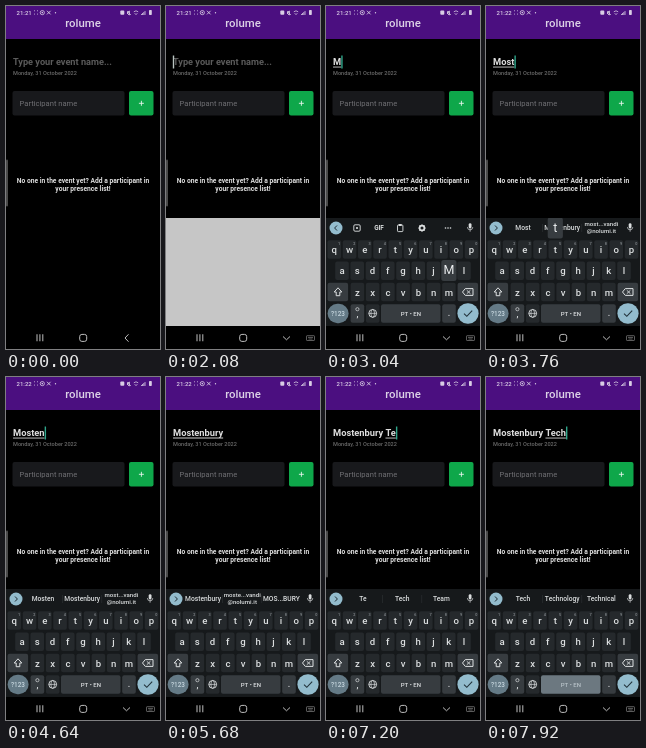
Write an HTML page with a canvas that moves like this. It is 154 px wide and 343 px high and loops after 8 s.

```html
<!DOCTYPE html>
<html lang="en">
<head>
<meta charset="utf-8">
<title>Presence list</title>
<style>
html, body { margin: 0; width: 100%; height: 100%; overflow: hidden; background: #000; }
canvas { display: block; width: 154px; height: 343px; }
</style>
</head>
<body>
<canvas id="stage"></canvas>
<script>
const W = 154, H = 343, LOOP = 8000;
const canvas = document.getElementById('stage');
const ctx = canvas.getContext('2d');
const ratio = window.devicePixelRatio || 1;
canvas.width = W * ratio;
canvas.height = H * ratio;

const TYPED = 'Mostenbury Tech';
const STROKES = [2940, 3200, 3520, 3760, 4240, 4480, 4760, 4900, 5040, 5160,
  6240, 6800, 7040, 7360, 7520];
const FOCUS = 2000, SLIDE_START = 2120, SLIDE_END = 2420, POPUP = 130;
const KB_TOP = 212, KB_BOTTOM = 320;
const PANEL = '#16191b', KEY = '#25292c', MOD = '#373c40';
const INK = '#dcdfe0', ACCENT = '#93bccd';
const ROWS = [
  { keys: 'qwertyuiop', x: 8.3, y: 243.5 },
  { keys: 'asdfghjkl', x: 16, y: 264.7 },
  { keys: 'zxcvbnm', x: 31.4, y: 286 }
];
const STEP = 15.25;

function box(x, y, w, h, color, r = 0) {
  ctx.fillStyle = color;
  ctx.beginPath();
  ctx.roundRect(x, y, w, h, r);
  ctx.fill();
}

function disc(x, y, r, color) {
  ctx.fillStyle = color;
  ctx.beginPath();
  ctx.arc(x, y, r, 0, 7);
  ctx.fill();
}

function ring(x, y, r, color, width = 0.8) {
  ctx.strokeStyle = color;
  ctx.lineWidth = width;
  ctx.beginPath();
  ctx.arc(x, y, r, 0, 7);
  ctx.stroke();
}

function line(points, color, width = 0.9) {
  ctx.strokeStyle = color;
  ctx.lineWidth = width;
  ctx.beginPath();
  points.forEach(([x, y]) => ctx.lineTo(x, y));
  ctx.stroke();
}

function frame(x, y, w, h, color, r = 1, width = 0.9) {
  ctx.strokeStyle = color;
  ctx.lineWidth = width;
  ctx.beginPath();
  ctx.roundRect(x, y, w, h, r);
  ctx.stroke();
}

function label(str, x, y, size, color, { weight = 400, align = 'left' } = {}) {
  ctx.font = `${weight} ${size}px Roboto, sans-serif`;
  ctx.textAlign = align;
  ctx.fillStyle = color;
  ctx.fillText(str, x, y);
  return ctx.measureText(str).width;
}

const centered = (str, x, y, size, color, weight = 400) =>
  label(str, x, y, size, color, { weight, align: 'center' });

function statusBar(t) {
  const c = '#d9cde4';
  label(t < 3760 ? '21:21' : '21:22', 10.5, 9, 6, c, { weight: 500 });
  for (const x of [28.5, 31.5]) {
    for (const y of [4.8, 8]) disc(x, y, 0.5, c);
  }
  ring(36.3, 6.6, 2.1, c, 0.8);
  disc(36.3, 6.6, 0.8, c);
  line([[41, 4.8], [44.6, 8.4]], c, 0.9);
  line([[44.6, 4.8], [41, 8.4]], c, 0.9);
  disc(49.5, 6.7, 0.7, c);
  box(114.3, 4.6, 4, 4.2, c, 1);
  line([[121, 7], [123.3, 5], [123.3, 9], [121, 7]], c, 1);
  line([[121, 5], [125, 9]], c, 0.7);
  line([[127.8, 5.8], [130, 4.8], [132.2, 5.8]], c, 0.8);
  line([[128.7, 7.2], [130, 8.6], [131.3, 7.2]], c, 0.8);
  for (let i = 0; i < 4; i++) box(135 + i * 1.2, 8 - i, 0.8, 1 + i, c);
  box(143, 4, 2.8, 5, c, 0.7);
}

function navBar(open) {
  const c = '#bdbdbd';
  box(0, KB_BOTTOM, W, H - KB_BOTTOM, '#000');
  for (let i = 0; i < 3; i++) box(30.5 + i * 2.9, 328.3, 1, 7, c);
  frame(73.7, 328.4, 7, 7, c, 2.2, 1);
  if (open) {
    line([[117, 330.5], [120.5, 333.8], [124, 330.5]], c, 1);
    frame(140.5, 329.7, 8, 4.8, '#858585', 0.6, 0.7);
    line([[142, 331.4], [147, 331.4]], '#858585', 0.7);
    line([[142.5, 333], [146.5, 333]], '#858585', 0.7);
  } else {
    line([[122.5, 328.3], [119, 332], [122.5, 335.7]], c, 1);
  }
}

function page(t, text) {
  box(0, 0, W, H, '#000');
  box(0, 0, W, 33, '#4b0f80');
  statusBar(t);
  centered('rolume', 77, 20.6, 11.4, '#ddd3e6', 500);

  let caretX = 7.2;
  if (text) {
    caretX += label(text, 7, 59.3, 9.3, '#dedede', { weight: 600 }) + 0.3;
    const start = text.lastIndexOf(' ') + 1;
    if (start < text.length) {
      const x = 7 + ctx.measureText(text.slice(0, start)).width;
      box(x, 60.6, ctx.measureText(text.slice(start)).width, 0.9, '#cfcfcf');
    }
  } else {
    label('Type your event name...', 7, 59.3, 9.2, '#5b5b5b', { weight: 600 });
  }
  const since = t - STROKES.reduce((last, s) => s <= t ? s : last, FOCUS);
  if (since >= 0 && Math.floor(since / 500) % 2 === 0) {
    box(caretX - 0.4, 49.5, 1.4, 13, text ? '#2fa58a' : '#b9c4c1');
  }

  label('Monday, 31 October 2022', 7, 68.8, 5.6, '#686868', { weight: 500 });
  box(6.5, 85, 112, 24.5, '#18191c', 2);
  label('Participant name', 13.5, 100, 7.6, '#707074');
  box(123, 85, 24.5, 24.5, '#0ea74a', 2);
  line([[132.9, 97.3], [137.9, 97.3]], '#e8f5ec', 0.9);
  line([[135.4, 94.8], [135.4, 99.8]], '#e8f5ec', 0.9);
  centered('No one in the event yet? Add a participant in', 77, 177.3, 6.7, '#dedede', 700);
  centered('your presence list!', 77, 185.3, 6.7, '#dedede', 700);
  box(0, 153.5, 2, 47, '#4b4b4b', 1);
}

function suggestions(text) {
  const [first, second] = text.split(' ');
  if (second === '') return ['Tech', 'United', 'By'];
  if (second) {
    return second.length < 3 ? [second, 'Tech', 'Team'] : [second, 'Technology', 'Technical'];
  }
  if (first.length < 4) return [first, 'Most', 'More'];
  if (first.length < 10) return [first, 'Mostenbury', 'most...vandi\n@nolumi.it'];
  return [first, 'moste...vandi\n@nolumi.it', 'MOS...BURY'];
}

function micIcon() {
  box(142.7, 217.2, 2.8, 5.2, INK, 1.4);
  line([[141.4, 221.1], [142.2, 223.3], [146, 223.3], [146.8, 221.1]], INK, 0.7);
  line([[144.1, 223.3], [144.1, 225.6]], INK, 0.8);
}

function toolbar(text, showWords) {
  disc(10, 222, 6.5, ACCENT);
  const d = showWords ? 1 : -1;
  line([[10 - d, 219.5], [10 + 1.4 * d, 222], [10 - d, 224.5]], '#1d2b33', 1);
  micIcon();
  if (showWords) {
    suggestions(text).forEach((word, i) => {
      const x = 37 + i * 39.2;
      const parts = word.split('\n');
      if (parts.length > 1) parts.forEach((p, j) => centered(p, x, 219.6 + j * 7.3, 6.1, INK, 500));
      else centered(word, x, 224.3, 6.7, INK, 500);
      if (i) box(x - 19.8, 218, 0.5, 8, '#33383b');
    });
    return;
  }
  frame(27.8, 218.8, 6.4, 6.4, INK, 1.2);
  disc(31, 222, 1.1, INK);
  centered('GIF', 53, 224.4, 6.4, INK, 700);
  frame(71.5, 219, 5.4, 6.6, INK, 0.8);
  box(72.7, 218, 3, 2, INK, 0.5);
  ring(96, 222, 2.4, INK, 1.7);
  for (let i = 0; i < 8; i++) {
    const a = i * Math.PI / 4;
    disc(96 + 3.2 * Math.cos(a), 222 + 3.2 * Math.sin(a), 0.6, INK);
  }
  for (let i = -1; i < 2; i++) disc(122 + i * 2.5, 222, 0.8, INK);
}

function letterKeys(caps) {
  ROWS.forEach(({ keys, x, y }, row) => [...keys].forEach((ch, i) => {
    const cx = x + i * STEP;
    box(cx - 6.8, y - 9.3, 13.6, 18.6, KEY, 2);
    centered(caps ? ch.toUpperCase() : ch, cx, y + 3.5, 9.6, INK, 500);
    if (row === 0) centered(String((i + 1) % 10), cx + 4.8, y - 4.5, 3.8, '#a3a9ad');
  }));
}

function modifierKeys(caps, spaceDown) {
  box(1.6, 276.7, 20.5, 18.6, MOD, 2);
  const arrow = [[12, 281.8], [15.8, 286], [13.8, 286], [13.8, 289.7],
    [10.2, 289.7], [10.2, 286], [8.2, 286], [12, 281.8]];
  line(arrow, INK, 1);
  if (caps) {
    ctx.fillStyle = INK;
    ctx.fill();
  }
  box(131.6, 276.7, 20.5, 18.6, MOD, 2);
  line([[136.5, 286], [139.3, 282.6], [147, 282.6], [147, 289.4], [139.3, 289.4], [136.5, 286]], INK, 1);
  line([[140.8, 284.3], [144.4, 287.7]], INK, 0.9);
  line([[144.4, 284.3], [140.8, 287.7]], INK, 0.9);

  box(1.6, 297.8, 21, 19.4, '#647a86', 9.7);
  centered('?123', 12, 309.8, 6.4, '#c6d6de', 500);
  box(24.6, 298.2, 13.6, 18.6, MOD, 2);
  ring(31.4, 303.2, 1.6, INK, 0.7);
  centered(',', 31.4, 311, 9, INK, 500);
  box(39.9, 298.2, 13.6, 18.6, KEY, 2);
  ring(46.7, 307.4, 3.9, INK, 0.9);
  line([[42.8, 307.4], [50.6, 307.4]], INK, 0.7);
  ctx.beginPath();
  ctx.ellipse(46.7, 307.4, 1.8, 3.9, 0, 0, 7);
  ctx.stroke();
  box(55, 298.2, 59.5, 18.6, spaceDown ? '#6c7880' : MOD, 2);
  centered('PT • EN', 84.8, 309.6, 6, spaceDown ? '#b9c3c8' : INK, 500);
  box(116.2, 298.2, 13.6, 18.6, MOD, 2);
  centered('.', 123, 309.5, 9, INK, 500);
  box(131.4, 297.3, 21.2, 20.4, ACCENT, 10.2);
  line([[138, 307.6], [140.8, 310.3], [146.2, 304.6]], '#22323a', 1.1);
}

function popup(ch) {
  const row = ROWS.find(r => r.keys.includes(ch.toLowerCase()));
  if (!row) return;
  const x = row.x + row.keys.indexOf(ch.toLowerCase()) * STEP;
  const y = row.y - 22;
  box(x - 7.6, y - 10, 15.2, 21, MOD, 2.5);
  centered(ch, x, y + 4, 12.5, '#eef1f2');
}

function keyboard(t, text) {
  const p = Math.min(1, Math.max(0, (t - SLIDE_START) / (SLIDE_END - SLIDE_START)));
  const rest = (1 - p) ** 3;
  const caps = !text || text.endsWith(' ');
  const index = text.length - 1;
  const pressed = index >= 0 && t - STROKES[index] < POPUP ? TYPED[index] : '';
  const spaceDown = pressed === ' ' || t >= 7880;

  box(0, KB_TOP, W, KB_BOTTOM - KB_TOP, '#c6c6c6');
  ctx.save();
  ctx.beginPath();
  ctx.rect(0, KB_TOP, W, KB_BOTTOM - KB_TOP);
  ctx.clip();
  ctx.translate(0, rest * (KB_BOTTOM - KB_TOP));
  box(0, KB_TOP, W, KB_BOTTOM - KB_TOP, PANEL);
  toolbar(text, t > STROKES[0] + 160);
  letterKeys(caps);
  modifierKeys(caps, spaceDown);
  if (pressed) popup(pressed);
  ctx.restore();
}

function draw(now) {
  const t = now % LOOP;
  const text = TYPED.slice(0, STROKES.filter(s => s <= t).length);
  ctx.setTransform(ratio, 0, 0, ratio, 0, 0);
  page(t, text);
  if (t >= FOCUS) keyboard(t, text);
  navBar(t >= FOCUS);
}

const begin = performance.now();
function tick() {
  draw(performance.now() - begin);
  requestAnimationFrame(tick);
}
tick();
</script>
</body>
</html>
```
